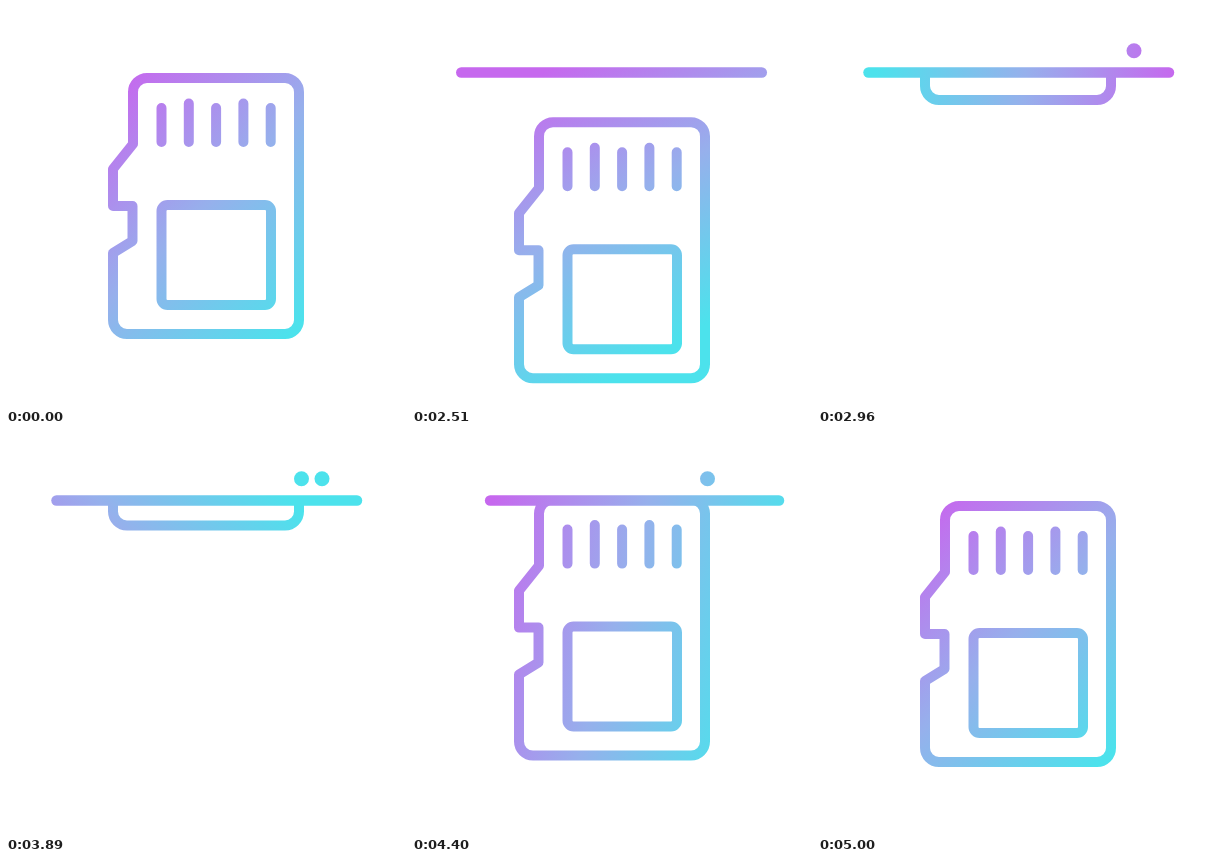
Write an HTML page with a canvas that moves like this. It is 400 px wide and 400 px high and loops after 5120 ms.

```html
<!DOCTYPE html>
<html lang="en">
<head>
<meta charset="utf-8">
<title>Memory card</title>
<style>
  html, body { margin: 0; width: 100%; height: 100%; overflow: hidden; background: #fff; }
  canvas { display: block; width: 400px; height: 400px; }
</style>
</head>
<body>
<canvas id="stage" width="400" height="400"></canvas>
<script>
const ctx = document.getElementById('stage').getContext('2d');
const LOOP = 5120, START = 2030, END = 5000, STEP = 30;
const SLOT_Y = 66.5;

const progress = (t, from, to) => Math.min(1, Math.max(0, (t - from) / (to - from)));
const soft = u => (1 - Math.cos(Math.PI * u)) / 2;
const strong = u => u < 0.5 ? 4 * u ** 3 : 1 - 4 * (1 - u) ** 3;

// Dip, rise into the slot, gather, drop out past the rest position, settle.
const cardY = t =>
  55 * soft(progress(t, 2000, 2390))
  - 289 * strong(progress(t, 2390, 2960))
  - 2.5 * soft(progress(t, 3680, 3890))
  + 261.5 * strong(progress(t, 3890, 4630))
  - 25 * soft(progress(t, 4630, 5000));

// The gradient makes one full turn in three eased parts.
const angle = t => 45
  + 140 * strong(progress(t, 2270, 3080))
  + 150 * strong(progress(t, 3110, 4200))
  + 70 * strong(progress(t, 4000, 4760));

const card = new Path2D(
  'M127 138V86A14 14 0 0 1 141 72H279A14 14 0 0 1 293 86V314' +
  'A14 14 0 0 1 279 328H121A14 14 0 0 1 107 314V247L126.5 235V200H107V163Z');
card.roundRect(155.5, 199, 109.5, 100, 6);
for (let i = 0; i < 5; i++) {
  const x = 155.5 + 27.3 * i;
  card.moveTo(x, i % 2 ? 97.5 : 102);
  card.lineTo(x, 136);
}

function drawCard(t) {
  ctx.save();
  ctx.beginPath();
  ctx.rect(0, SLOT_Y, 400, 400);
  ctx.clip();
  ctx.translate(0, cardY(t));
  ctx.lineWidth = 10;
  ctx.stroke(card);
  ctx.restore();
}

function drawSlot(t) {
  if (t < START) return;
  const enter = -345 * (1 - progress(t, START, 2550)) ** 2.2;
  const leave = progress(t, 4000, 4760);
  ctx.lineWidth = 10.5;
  ctx.beginPath();
  ctx.moveTo(50.5 + enter + 360 * leave ** 4, SLOT_Y);
  ctx.lineTo(351 + enter + 360 * leave ** 4.85, SLOT_Y);
  if (leave < 1) ctx.stroke();
}

function drawDot(t, x, shown, hidden) {
  const size = soft(progress(t, shown, shown + 150)) - soft(progress(t, hidden, hidden + 150));
  ctx.beginPath();
  ctx.arc(x, 44.7, 7.5 * size, 0, 2 * Math.PI);
  ctx.fill();
}

// Colours everything drawn so far with the turning gradient.
function tint(t) {
  const a = angle(t) * Math.PI / 180;
  const dx = 150 * Math.cos(a), dy = 150 * Math.sin(a);
  const ramp = ctx.createLinearGradient(200 - dx, 200 - dy, 200 + dx, 200 + dy);
  ramp.addColorStop(0, '#c668ee');
  ramp.addColorStop(0.5, '#96b0ec');
  ramp.addColorStop(1, '#4ce2ec');
  ctx.save();
  ctx.globalCompositeOperation = 'source-in';
  ctx.fillStyle = ramp;
  ctx.fillRect(0, 0, 400, 400);
  ctx.restore();
}

function draw(now) {
  const raw = now % LOOP;
  const t = raw < START ? 0 : Math.min(END, START + Math.floor((raw - START) / STEP) * STEP);
  ctx.clearRect(0, 0, 400, 400);
  ctx.lineCap = ctx.lineJoin = 'round';
  drawCard(t);
  drawSlot(t);
  drawDot(t, 316, 2780, 4230);
  drawDot(t, 295.5, 3170, 4410);
  tint(t);
}

const origin = performance.now();
function tick() {
  draw(performance.now() - origin);
  requestAnimationFrame(tick);
}
tick();
</script>
</body>
</html>
```
